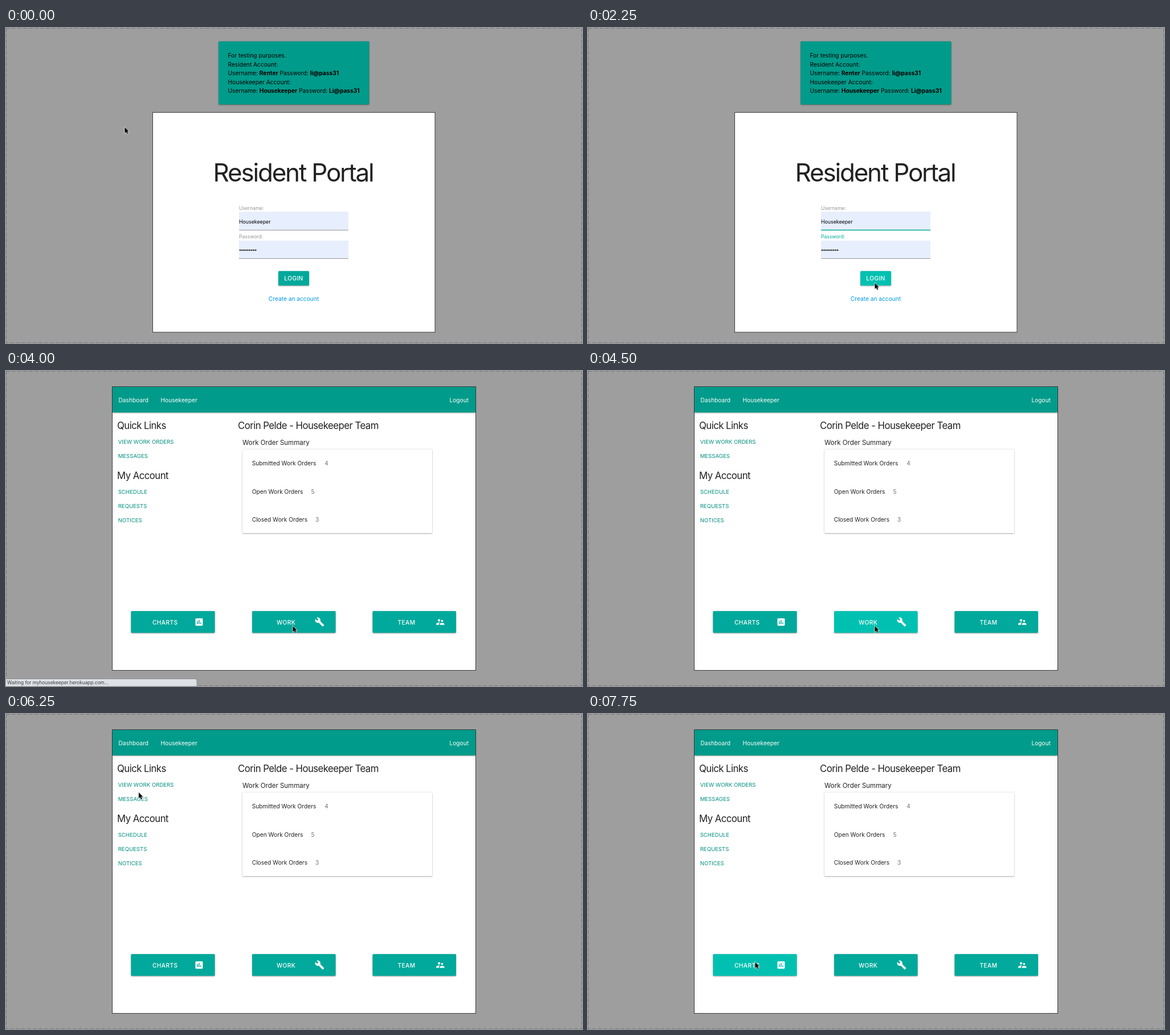
Write an HTML page that moves like this. It is 1011 by 554 pixels and loops after 8 s.

```html
<!DOCTYPE html>
<html lang="en">
<head>
<meta charset="utf-8">
<title>Resident Portal</title>
<style>
  :root { --teal: #009b8a; --button: #00a99b; --half: #00b5a6; --hover: #00c1b1; }
  html, body { margin: 0; width: 100%; height: 100%; overflow: hidden; background: #9e9e9e; }
  svg { display: block; width: 100%; height: 100%; }
  text { font: 10.2px Inter, "Open Sans", sans-serif; font-optical-sizing: none; fill: #212121; white-space: pre; }

  .black text { fill: #000; }
  .bold { font-weight: 700; }
  .title { font-size: 44px; letter-spacing: -2.2px; }
  .heading { font-size: 16.8px; letter-spacing: -.55px; }
  .subheading { font-size: 11.5px; }
  .links text { font-size: 9.6px; fill: #008f80; }
  .label { font-size: 8.5px; fill: #959595; }
  .count { fill: #757575; }
  .caps { letter-spacing: .4px; font-weight: 500; }
  .white, .white text { fill: #fff; }
  .small { font-size: 8.8px; }
  .large { font-size: 10.6px; }
  .status { font-size: 8.3px; fill: #3a3c40; }
  .paper { fill: #fff; stroke: #3c3c3c; }
  .raised { filter: drop-shadow(0 1.2px 1px rgba(0,0,0,.3)) drop-shadow(0 0 .6px rgba(0,0,0,.2)); }
  .button { fill: var(--button); }
  .field { fill: #e7eefe; }
  .rule { stroke: #999; }
  .dots { stroke: #111; stroke-linecap: round; }
  .edge { fill: none; stroke: #747474; stroke-dasharray: 6 4; }

  /* Every change is a hard cut on a quarter-second grid (3.125% each). */
  .anim { animation: 8s step-end infinite; }
  #login { animation-name: login; }
  #dashboard { animation-name: dashboard; }
  #idle { animation-name: idle; }
  #submitted { animation-name: submitted; }
  #focus { animation-name: focus; }
  #hint { animation-name: hint; }
  #caret { animation-name: caret; }
  #loginButton { animation-name: login-hover; }
  #workButton { animation-name: work-hover; }
  #chartsButton { animation-name: charts-hover; }
  #navHover { animation-name: nav-hover; }
  #status { animation-name: status; }
  #cursor { animation-name: move; }

  @keyframes login { 0% { visibility: visible } 50% { visibility: hidden } }
  @keyframes dashboard { 0% { visibility: hidden } 50% { visibility: visible } }
  @keyframes idle { 0% { opacity: 1 } 40.625% { opacity: 0 } }
  @keyframes submitted { 0% { opacity: 0 } 40.625% { opacity: 1 } }
  @keyframes focus { 0%, 43.75% { opacity: 0 } 9.375% { opacity: 1 } 40.625% { opacity: .5 } }
  @keyframes hint { 0%, 43.75% { fill: #959595 } 9.375% { fill: #00a99b } 40.625% { fill: #4a9f98 } }
  @keyframes caret {
    0%, 15.625%, 28.125%, 40.625% { opacity: 0 }
    9.375%, 21.875%, 34.375% { opacity: 1 }
  }
  @keyframes login-hover { 0% { fill: var(--button) } 25% { fill: var(--half) } 28.125% { fill: var(--hover) } }
  @keyframes work-hover {
    0%, 62.5% { fill: var(--button) }
    53.125%, 59.375% { fill: var(--half) }
    56.25% { fill: var(--hover) }
  }
  @keyframes charts-hover { 0% { fill: var(--button) } 93.75% { fill: var(--half) } 96.875% { fill: var(--hover) } }
  @keyframes nav-hover { 0%, 78.125% { opacity: 0 } 71.875% { opacity: .1 } 75% { opacity: .05 } }
  @keyframes status { 0%, 56.25% { opacity: 0 } 43.75% { opacity: 1 } 53.125% { opacity: .5 } }
  @keyframes move {
    0% { transform: translate(208.5px, 174.5px) }
    12.5% { transform: translate(318px, 275px) }
    15.625% { transform: translate(444px, 383px) }
    18.75% { transform: translate(470.5px, 436px) }
    21.875% { transform: translate(495.5px, 460px) }
    25% { transform: translate(503.5px, 450px) }
    28.125% { transform: translate(503.5px, 448.5px) }
    59.375% { transform: translate(472px, 413px) }
    62.5% { transform: translate(381px, 319.5px) }
    65.625% { transform: translate(339.5px, 290px) }
    71.875% { transform: translate(300px, 52px) }
    75% { transform: translate(238px, 114px) }
    78.125% { transform: translate(233px, 138px) }
    81.25% { transform: translate(242px, 205px) }
    84.375% { transform: translate(251px, 255.5px) }
    90.625% { transform: translate(276px, 402px) }
    93.75% { transform: translate(293.5px, 436.5px) }
  }
</style>
</head>
<body>
<svg viewBox="0 0 1011 554" preserveAspectRatio="none">
  <rect width="1011" height="554" fill="#9e9e9e"/>
  <rect class="edge" x=".5" y=".5" width="1010" height="553"/>

  <g id="login" class="anim">
    <rect class="raised" x="373" y="23.5" width="264.5" height="111" rx="1.5" fill="#009b8a"/>
    <g class="black">
      <text x="389.5" y="52">For testing purposes.</text>
      <text x="389.5" y="67.5">Resident Account:</text>
      <text x="389.5" y="83">Username: <tspan class="bold">Renter</tspan> Password: <tspan class="bold">li@pass31</tspan></text>
      <text x="389.5" y="98.5">Housekeeper Account:</text>
      <text x="389.5" y="114">Username: <tspan class="bold">Housekeeper</tspan> Password: <tspan class="bold">Li@pass31</tspan></text>
    </g>

    <rect class="paper" x="257.5" y="148.5" width="495.5" height="386.5"/>
    <text class="title" x="363.5" y="270">Resident Portal</text>

    <text class="label" x="409" y="319.5">Username:</text>
    <rect class="field" x="409" y="323" width="192" height="32"/>
    <path class="rule" d="M409 355.5h192"/>
    <text id="hint" class="label anim" x="409" y="370">Password:</text>
    <rect class="field" x="409" y="374" width="192" height="31"/>
    <path class="rule" d="M409 405.5h192"/>
    <rect id="focus" class="anim" x="409" y="354.7" width="192" height="1.5" fill="#00a99b"/>

    <g id="idle" class="black anim">
      <text class="small" x="409" y="343.5">Housekeeper</text>
      <path class="dots" d="M411 390.7h27.3" stroke-width="2.5" stroke-dasharray="0 3.4"/>
    </g>
    <g id="submitted" class="black anim">
      <text class="large" x="409" y="343.5">Housekeeper</text>
      <path class="dots" d="M411.8 390.8h42.5" stroke-width="2.2" stroke-dasharray="0 5.3"/>
    </g>
    <rect id="caret" class="anim" x="409" y="333" width="1" height="13"/>

    <g class="raised"><rect id="loginButton" class="button anim" x="478" y="427.5" width="54" height="25.5" rx="1.5"/></g>
    <text class="caps white" x="505" y="443.7" text-anchor="middle">LOGIN</text>
    <text x="505" y="480" text-anchor="middle" style="fill:#0098e6">Create an account</text>
  </g>

  <g id="dashboard" class="anim">
    <rect class="paper" x="186.5" y="27.5" width="638" height="499"/>
    <rect class="raised" x="187" y="28" width="637" height="45" fill="#009b8a"/>
    <rect id="navHover" class="anim" x="261" y="28" width="83" height="45"/>
    <g class="white">
      <text x="197.5" y="55">Dashboard</text>
      <text x="271.5" y="55">Housekeeper</text>
      <text x="778.5" y="55">Logout</text>
    </g>

    <text class="heading" x="195" y="101.5">Quick Links</text>
    <text class="heading" x="195" y="189.5">My Account</text>
    <g class="links">
      <text x="196.7" y="127.5">VIEW WORK ORDERS</text>
      <text x="196.7" y="153">MESSAGES</text>
      <text x="196.7" y="215.5">SCHEDULE</text>
      <text x="196.7" y="241">REQUESTS</text>
      <text x="196.7" y="266">NOTICES</text>
    </g>

    <text class="heading" x="407" y="101.5">Corin Pelde - Housekeeper Team</text>
    <text class="subheading" x="415" y="129.5">Work Order Summary</text>
    <rect class="raised" x="415" y="137.5" width="333" height="147.5" rx="1" fill="#fff"/>
    <text x="431.7" y="166">Submitted Work Orders</text><text class="count" x="559.3" y="166">4</text>
    <text x="431.7" y="215.5">Open Work Orders</text><text class="count" x="535.5" y="215.5">5</text>
    <text x="431.7" y="265">Closed Work Orders</text><text class="count" x="543" y="265">3</text>

    <g class="raised">
      <rect id="chartsButton" class="button anim" x="219.5" y="422.3" width="147" height="38.2" rx="1.5"/>
      <rect id="workButton" class="button anim" x="432" y="422.3" width="146.5" height="38.2" rx="1.5"/>
      <rect class="button" x="643.5" y="422.3" width="146.5" height="38.2" rx="1.5"/>
    </g>
    <text class="caps white" x="257" y="445.5">CHARTS</text>
    <text class="caps white" x="475" y="445.5">WORK</text>
    <text class="caps white" x="687.5" y="445.5">TEAM</text>

    <g class="white">
      <path transform="translate(330.3 432.8) scale(.72)" fill-rule="evenodd"
        d="M5 3h14q2 0 2 2v14q0 2-2 2H5q-2 0-2-2V5q0-2 2-2zM7 10v7h2v-7zM11 7v10h2V7zM15 13v4h2v-4z"/>
      <path transform="translate(541.8 432.8) scale(.72)"
        d="M22.7 19l-9.1-9.1c.9-2.3.4-5-1.5-6.9-2-2-5-2.4-7.4-1.3L9 6 6 9 1.6 4.7C.4 7.1.9 10.1 2.9 12.1c1.9 1.9 4.6 2.4 6.9 1.5l9.1 9.1c.4.4 1 .4 1.4 0l2.3-2.3c.5-.4.5-1.1.1-1.4z"/>
      <g transform="translate(753.6 432.8) scale(.72)">
        <circle cx="16.5" cy="9.5" r="2.5"/>
        <circle cx="9" cy="8" r="3"/>
        <path d="M16.5 14c-1.8 0-5.5.9-5.5 2.75V19h11v-2.25c0-1.85-3.7-2.75-5.5-2.75zM9 13c-2.3 0-7 1.2-7 3.5V19h7v-2.25c0-.85.3-2.35 2.4-3.5C10.5 13.1 9.7 13 9 13z"/>
      </g>
    </g>
  </g>

  <g id="status" class="anim">
    <path d="M-1 541.5H332q3 0 3 3V555H-1z" fill="#dee1e6" stroke="#8c8e91"/>
    <text class="status" x="2" y="550.5">Waiting for myhousekeeper.herokuapp.com...</text>
  </g>

  <g id="cursor" class="anim">
    <path d="M0 0V10.3L2.4 8.2 4 12 5.8 11.2 4.2 7.5H7.3Z" stroke="#fff" stroke-width="1.4" paint-order="stroke"
      style="filter: drop-shadow(0 .8px .7px rgba(0,0,0,.35))"/>
  </g>
</svg>
</body>
</html>
```
